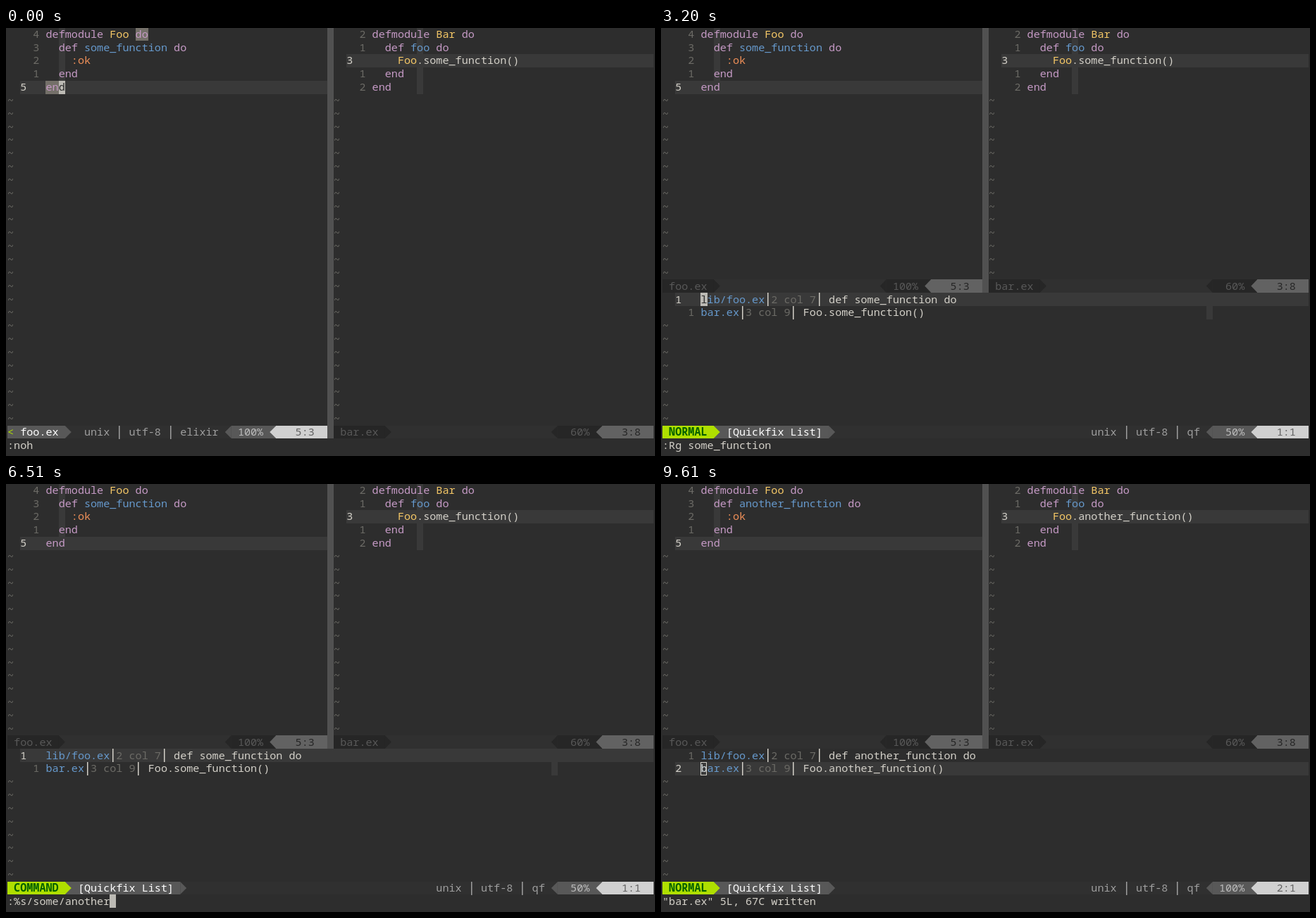
Write an HTML page with a canvas that moves like this. It is 921 px wide and 608 px high and loops after 9640 ms.

```html
<!DOCTYPE html>
<html lang="en">
<head>
<meta charset="utf-8">
<title>Editor session</title>
<style>
html, body { margin: 0; width: 100%; height: 100%; overflow: hidden; background: #2d2d2d; }
canvas { display: block; width: 921px; height: 608px; }
</style>
</head>
<body>
<canvas id="stage" width="921" height="608"></canvas>
<script>
const ctx = document.getElementById('stage').getContext('2d');
const LOOP = 9640, CW = 9.08, RH = 18.84, LEFT = 2;
const FONT = '15.13px "Noto Sans Mono", "DejaVu Sans Mono", monospace';
const C = {
  bg: '#2d2d2d', fg: '#d3d0c8', line: '#393939', dim: '#6c6b66', split: '#515151',
  purple: '#c59ac5', yellow: '#f4c766', blue: '#6699cc', orange: '#ee8f58',
  match: '#747069', bar: '#303030', mid: '#585858', light: '#d0d0d0',
  off: '#262626', offEnd: '#626262', info: '#9e9e9e', green: '#afdf00', cursor: '#bcbab4'
};

// Key times for each typed run; the first entry is the opening colon.
const SEARCH = { text: ':Rg some_function',
  at: [1000, 1130, 1270, 1400, 1530, 1600, 1670, 1840, 1920, 1990, 2080, 2140, 2200, 2370, 2440, 2500, 2570] };
const REPLACE = { text: ':%s/some/another/',
  at: [3640, 3720, 3800, 3970, 4030, 4090, 4140, 4200, 5380, 5650, 5740, 5830, 5920, 6010, 6090, 6200, 7170] };
const LIST_AT = 2810, SUBST_AT = 7650, WRITE_KEY = 7900, SAVE_AT = 8290, DONE_AT = 8440;
const HIDE = [3210, 4400, 5230, 6240, 6810, 7610, 8410, 9210];
const SHOW = [3600, 4800, 5610, 6410, 7210, 8050, 8810, 9610];
const FADE = 100;

const colX = c => LEFT + c * CW;
const rowY = r => Math.max(0, Math.round(r * RH - 0.6));

function fill(col, row, cols, color, rows = 1) {
  const x = Math.round(colX(col)), y = rowY(row);
  ctx.fillStyle = color;
  ctx.fillRect(x, y, Math.round(colX(col + cols)) - x, rowY(row + rows) - y);
}

// Places each character on the terminal grid and returns the next column.
function put(col, row, text, color, bold) {
  ctx.font = (bold ? 'bold ' : '') + FONT;
  ctx.fillStyle = color;
  const y = Math.round(row * RH + 13.7);
  for (const ch of text) {
    if (ch === '|') ctx.fillRect(Math.round(colX(col) + 3.8), rowY(row), 1.5, 19);
    else if (ch !== ' ') ctx.fillText(ch, colX(col), y);
    col++;
  }
  return col;
}

function spans(col, row, parts) {
  for (const [text, color] of parts) col = put(col, row, text, color);
}

function arrow(col, row, dir, color, back) {
  fill(col, row, 1, back);
  const a = colX(dir > 0 ? col : col + 1), b = colX(dir > 0 ? col + 1 : col);
  const top = rowY(row), end = rowY(row + 1);
  ctx.fillStyle = color;
  ctx.beginPath();
  ctx.moveTo(a, top);
  ctx.lineTo(b, (top + end) / 2);
  ctx.lineTo(a, end);
  ctx.fill();
}

function numbers(base, top, count, current) {
  for (let i = 0; i < count; i++) {
    if (i === current) put(base + 2, top + i, String(i + 1), C.fg);
    else put(base + 4, top + i, String(Math.abs(i - current)), C.dim);
  }
}

function tildes(base, from, to) {
  for (let r = from; r < to; r++) put(base, r, '~', C.dim);
}

function position(base, row, percent, place, active) {
  const box = active ? C.mid : C.off, end = active ? C.light : C.offEnd;
  arrow(base + 34, row, -1, box, C.bar);
  fill(base + 35, row, 6, box);
  put(base + 36, row, percent.padStart(4), active ? '#bcbcbc' : C.mid);
  arrow(base + 41, row, -1, end, box);
  fill(base + 42, row, 8, end);
  put(base + 45, row, place, active ? '#626262' : C.off);
}

function idleStatus(base, row, name, percent, place) {
  fill(base, row, 50, C.bar);
  fill(base, row, 8, C.off);
  put(base + 1, row, name, C.mid);
  arrow(base + 8, row, 1, C.off, C.bar);
  position(base, row, percent, place, false);
}

function fooStatus() {
  fill(0, 30, 50, C.bar);
  fill(0, 30, 9, C.mid);
  put(0, 30, '<', C.green);
  put(2, 30, 'foo.ex', '#fff');
  arrow(9, 30, 1, C.mid, C.bar);
  put(12, 30, 'unix | utf-8 | elixir', C.info);
  position(0, 30, '100%', '5:3', true);
}

function listStatus(mode, changed, line) {
  const end = mode.length + 2;
  const title = '[Quickfix List]' + (changed ? ' | +' : '');
  const stop = end + 3 + title.length;
  fill(0, 30, 101, C.bar);
  fill(0, 30, end, C.green);
  put(1, 30, mode, '#005f00', true);
  fill(end, 30, stop - end, C.mid);
  arrow(end, 30, 1, C.green, C.mid);
  put(end + 2, 30, title, '#fff');
  arrow(stop, 30, 1, C.mid, C.bar);
  put(67, 30, 'unix | utf-8 | qf', C.info);
  position(51, 30, line * 50 + '%', line + ':1', true);
}

function hit(col, row) {
  fill(col, row, 4, C.match);
  put(col, row, 'some', '#444444');
}

function panes(name, bottom, matching, marked) {
  fill(8, 0, 1, C.line, 4);
  fill(64, 0, 1, C.line, 5);
  fill(2, 4, 48, C.line);
  fill(53, 2, 48, C.line);
  fill(50, 0, 1, C.split, bottom + 1);
  if (matching) {
    fill(20, 0, 2, C.match);
    fill(6, 4, 3, C.match);
  }
  numbers(0, 0, 5, 4);
  numbers(51, 0, 5, 2);
  spans(6, 0, [['defmodule ', C.purple], ['Foo ', C.yellow], ['do', C.purple]]);
  spans(8, 1, [['def ', C.purple], [name, C.blue], [' do', C.purple]]);
  put(10, 2, ':ok', C.orange);
  put(8, 3, 'end', C.purple);
  put(6, 4, 'end', C.purple);
  spans(57, 0, [['defmodule ', C.purple], ['Bar ', C.yellow], ['do', C.purple]]);
  spans(59, 1, [['def ', C.purple], ['foo', C.blue], [' do', C.purple]]);
  spans(61, 2, [['Foo', C.yellow], ['.' + name + '()', C.fg]]);
  put(59, 3, 'end', C.purple);
  put(57, 4, 'end', C.purple);
  if (marked) {
    hit(12, 1);
    hit(65, 2);
  }
  tildes(0, 5, bottom);
  tildes(51, 5, bottom);
}

function quickfix(name, line) {
  fill(2, 19 + line, 99, C.line);
  if (line === 1) fill(85, 21, 1, C.line);
  numbers(0, 20, 2, line - 1);
  spans(6, 20, [['lib/foo.ex', C.blue], ['|', C.fg], ['2 col 7', C.dim], ['| def ' + name + ' do', C.fg]]);
  spans(6, 21, [['bar.ex', C.blue], ['|', C.fg], ['3 col 9', C.dim], ['| Foo.' + name + '()', C.fg]]);
  tildes(0, 22, 30);
}

const typed = (run, t) => run.text.slice(0, run.at.filter(k => k <= t).length);

function commandLine(t) {
  if (t < 1000) return ':noh';
  if (t < REPLACE.at[0]) return typed(SEARCH, t);
  if (t < WRITE_KEY) return typed(REPLACE, t);
  if (t < SAVE_AT) return t < 8110 ? ':' : ':w';
  return t < DONE_AT ? '"lib/foo.ex" 5L, 61C written' : '"bar.ex" 5L, 67C written';
}

// Fill strength of the block, and whether it is just coming back.
function blink(t) {
  const last = list => list.filter(k => k <= t).pop() ?? -1e4;
  const off = last(HIDE), on = last(SHOW);
  const p = Math.min(1, (t - Math.max(off, on)) / FADE);
  return off > on ? { power: 1 - p, rising: false } : { power: p, rising: p < 1 };
}

function cursor(col, row, ch, t) {
  const { power, rising } = blink(t);
  if (power > 0) {
    ctx.globalAlpha = power;
    fill(col, row, 1, C.cursor);
    ctx.globalAlpha = 1;
    put(col, row, ch, power > 0.65 ? C.bg : C.fg);
  }
  if (rising) {
    ctx.strokeStyle = C.fg;
    ctx.lineWidth = 1;
    ctx.strokeRect(Math.round(colX(col)) + 0.5, rowY(row) + 0.5, 8, 18);
  }
}

function draw(t) {
  const listed = t >= LIST_AT, changed = t >= SUBST_AT && t < SAVE_AT;
  const line = t >= SUBST_AT ? 2 : 1;
  const command = (t >= 1000 && t < 2740) || (t >= REPLACE.at[0] && t < SUBST_AT) ||
    (t >= WRITE_KEY && t < SAVE_AT);
  const text = commandLine(t);

  ctx.fillStyle = C.bg;
  ctx.fillRect(0, 0, 921, 608);
  panes(t >= SAVE_AT ? 'another_function' : 'some_function', listed ? 19 : 30, !listed, changed);
  if (listed) {
    idleStatus(0, 19, 'foo.ex', '100%', '5:3');
    idleStatus(51, 19, 'bar.ex', '60%', '3:8');
    quickfix(line === 2 ? 'another_function' : 'some_function', line);
    listStatus(command ? 'COMMAND' : 'NORMAL', changed, line);
  } else {
    fooStatus();
    idleStatus(51, 30, 'bar.ex', '60%', '3:8');
  }
  put(0, 31, text, C.fg);

  if (command) {
    const col = t >= 8110 && t < 8210 ? 1 : text.length;
    cursor(col, 31, text[col] || ' ', t);
  } else if (listed) {
    cursor(6, 19 + line, line === 2 ? 'b' : 'l', t);
  } else {
    cursor(8, 4, 'd', t);
  }
}

const start = performance.now();
function tick() {
  draw((performance.now() - start) % LOOP);
  requestAnimationFrame(tick);
}
tick();
</script>
</body>
</html>
```
